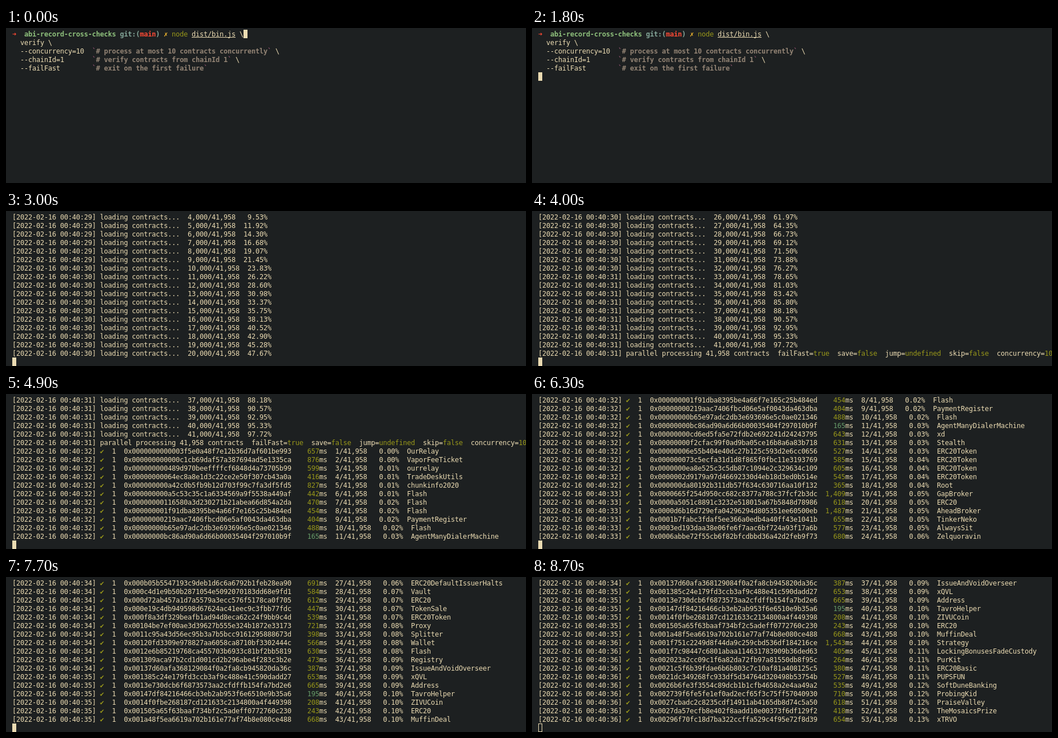
An HTML page with a canvas that plays this animation: 913 by 273 pixels, repeating every 8900 ms.

```html
<!DOCTYPE html>
<html lang="en">
<head>
<meta charset="utf-8">
<title>Terminal session</title>
<style>
  html, body { margin: 0; width: 100%; height: 100%; overflow: hidden; background: #1d2021; }
  canvas { display: block; }
</style>
</head>
<body>
<canvas id="term" width="913" height="273"></canvas>
<script>
const ctx = document.getElementById('term').getContext('2d');
const LOOP = 8900, ROWS = 17, LEFT = 11, TOP = 3, CELL = 7, LINE = 15;
const FONT = '12px "DejaVu Sans Mono", monospace';
const C = {
  bg: '#1d2021', fg: '#ebdbb2', red: '#fb4934', aqua: '#8ec07c', blue: '#83a598',
  yellow: '#fabd2f', olive: '#98971a', green: '#689d6a', purple: '#b16286', gray: '#928374'
};
const TOTAL = 41958;

// A span is [text, colour, style]; a line is a list of spans.
const span = (text, color = C.fg, style = '') => [text, color, style];
const bold = (text, color) => span(text, color, 'bold');
const stamp = sec => span(`[2022-02-16 00:40:${sec}] `);
const num = n => n.toLocaleString('en-US');
const progress = n => `${num(n)}/${num(TOTAL)}  ${(n / TOTAL * 100).toFixed(2).padStart(5)}%`
  .replace(/  ( ?)(\d)/, '  $1$2');

const option = (flag, note, end) => [
  span('  ' + flag.padEnd(18)), span('`', C.purple), bold('# ' + note, C.gray),
  span('`', C.purple), span(end)
];

const command = [
  [bold('➜', C.red), span('  '), bold('abi-record-cross-checks', C.aqua), span(' '),
   bold('git:(', C.blue), bold('main', C.red), bold(')', C.blue), span(' '),
   bold('✗', C.yellow), span(' '), span('node', C.olive), span(' '),
   span('dist/bin.js', C.fg, 'underline'), span(' \\')],
  [span('  verify \\')],
  option('--concurrency=10', 'process at most 10 contracts concurrently', ' \\'),
  option('--chainId=1', 'verify contracts from chainId 1', ' \\'),
  option('--failFast', 'exit on the first failure', '')
];

function loadLine(n) {
  const sec = n < 10 ? 29 : n < 33 ? 30 : 31;
  const pct = (n * 1000 / TOTAL * 100).toFixed(2) + '%';
  return [stamp(sec), span(`loading contracts...  ${num(n * 1000)}/${num(TOTAL)}  ${pct.padStart(6)}`)];
}

const settings = { failFast: true, save: false, jump: undefined, skip: false, concurrency: 10 };
const summary = [
  stamp(31), span(`parallel processing ${num(TOTAL)} contracts`),
  ...Object.entries(settings).flatMap(([k, v]) => [span(`  ${k}=`), span(String(v), C.olive)])
];

// address prefix, duration in ms, contract name
const contracts = `0000000000003f5e 657 OurRelay
000000000000c1cb 876 VaporFeeTicket
000000000489d 599 ourrelay
00000000064ec 416 TradeDeskUtils
000000000a42c 827 chunkinfo2020
000000000a5c5 442 Flash
000000001165 470 Flash
000000001f91 454 Flash
00000000219a 404 PaymentRegister
00000000b65e 488 Flash
00000000bc86 165 AgentManyDialerMachine
00000000cd6e 643 xd
00000000f2cf 631 Stealth
00000006e55 527 ERC20Token
000000073c5 585 ERC20Token
0000000ea8e 605 ERC20Token
0000002d91 545 ERC20Token
000000da80 365 Root
0000665f 1409 GapBroker
0000a505 618 ERC20
0000d6b1 1487 AheadBroker
0001b7fa 655 TinkerNeko
0003ed19 577 AlwaysSit
0006abbe 680 Zelquoravin
0008e939 462 ForetellPLNQ7TicketDelayer
000ab58c 1229 VaporElks
000b05b5 691 ERC20DefaultIssuerHalts
000c4d1e 584 Vault
000d72ab 612 ERC20
000e19c4 447 TokenSale
000f8a3d 539 ERC20Token
00104be7 721 Proxy
0011c95a 398 Splitter
00120fd3 566 Wallet
0012e6b8 630 Flash
001309ac 473 Registry
00137d60 387 IssueAndVoidOverseer
001385c2 653 xQVL
0013e730 665 Address
00147df8 195 TavroHelper
0014f0fb 208 ZIVUCoin
001505a6 243 ERC20
001a48f5 668 MuffinDeal
001f751c 1543 Strategy
001f7c98 405 LockingBonusesFadeCustody
002023a2 264 PurKit
0021c5f6 380 ERC20Basic
0021dc34 527 PUPSFUN
0026b6fe 535 SoftDuneBanking
002739f6 710 ProbingKid
0027cbad 618 PraiseValley
0027da57 418 TheMosaicsPrize
00296f70 654 xTRVO`.split('\n').map(row => row.split(' '));

let seed = 2022;
function hexDigit() {
  seed = (seed * 1664525 + 1013904223) % 4294967296;
  return (seed >>> 28).toString(16);
}

function resultLine([prefix, ms, name], i) {
  const n = i + 1;
  const sec = n < 19 ? 32 : n < 26 ? 33 : n < 38 ? 34 : n < 44 ? 35 : 36;
  let address = '0x' + prefix;
  while (address.length < 42) address += hexDigit();
  const pct = (n / TOTAL * 100).toFixed(2) + '%';
  return [
    stamp(sec), span('✔', C.olive), span(`  1  ${address}  `),
    span(num(+ms).padStart(5), ms < 200 ? C.green : C.olive),
    span(`ms  ${n}/${num(TOTAL)}  ${pct.padStart(6)}  ${name}`)
  ];
}

const LOADS = 41;
const log = [
  ...command,
  ...Array.from({ length: LOADS }, (_, i) => loadLine(i + 1)),
  summary,
  ...contracts.map(resultLine)
];

// [time, results printed by then]
const bursts = [[4000, 0], [4700, 10], [4900, 11], [5600, 18], [6300, 24], [6400, 25],
  [6800, 27], [7100, 35], [7200, 37], [7700, 43], [8600, 53]];

function printed(t) {
  if (t < 2200) return command.length;
  if (t < 4000) {
    const step = Math.floor((t - 2100) / 100);
    return command.length + Math.floor(step * LOADS / 18);
  }
  const done = bursts.filter(([at]) => at <= t).pop()[1];
  return command.length + LOADS + 1 + done;
}

function drawLine(spans, row) {
  const y = TOP + row * LINE + 12;
  let x = LEFT;
  for (const [text, color, style] of spans) {
    ctx.fillStyle = color;
    ctx.font = style === 'bold' ? 'bold ' + FONT : FONT;
    if (style === 'underline') ctx.fillRect(x, y + 1, text.length * CELL, 1);
    for (const ch of text) {
      if (ch !== ' ') ctx.fillText(ch, x, y);
      x += CELL;
    }
  }
}

function drawCursor(col, row, hollow) {
  const x = LEFT + col * CELL, y = TOP + row * LINE;
  ctx.fillStyle = C.fg;
  ctx.fillRect(x, y, CELL, LINE);
  if (hollow) {
    ctx.fillStyle = C.bg;
    ctx.fillRect(x + 1, y + 1, CELL - 2, LINE - 2);
  }
}

let shown = '';
function render(t) {
  const count = printed(t), typing = t < 1800, hollow = t >= 8700;
  const key = [count, typing, hollow].join();
  if (key === shown) return;
  shown = key;
  ctx.fillStyle = C.bg;
  ctx.fillRect(0, 0, 913, 273);
  const rows = log.slice(Math.max(0, count - ROWS), count);
  rows.forEach(drawLine);
  if (typing) drawCursor(58, 0, false);
  else drawCursor(0, rows.length, hollow);
}

const start = performance.now();
function tick() {
  render((performance.now() - start) % LOOP);
  requestAnimationFrame(tick);
}
tick();
</script>
</body>
</html>
```
